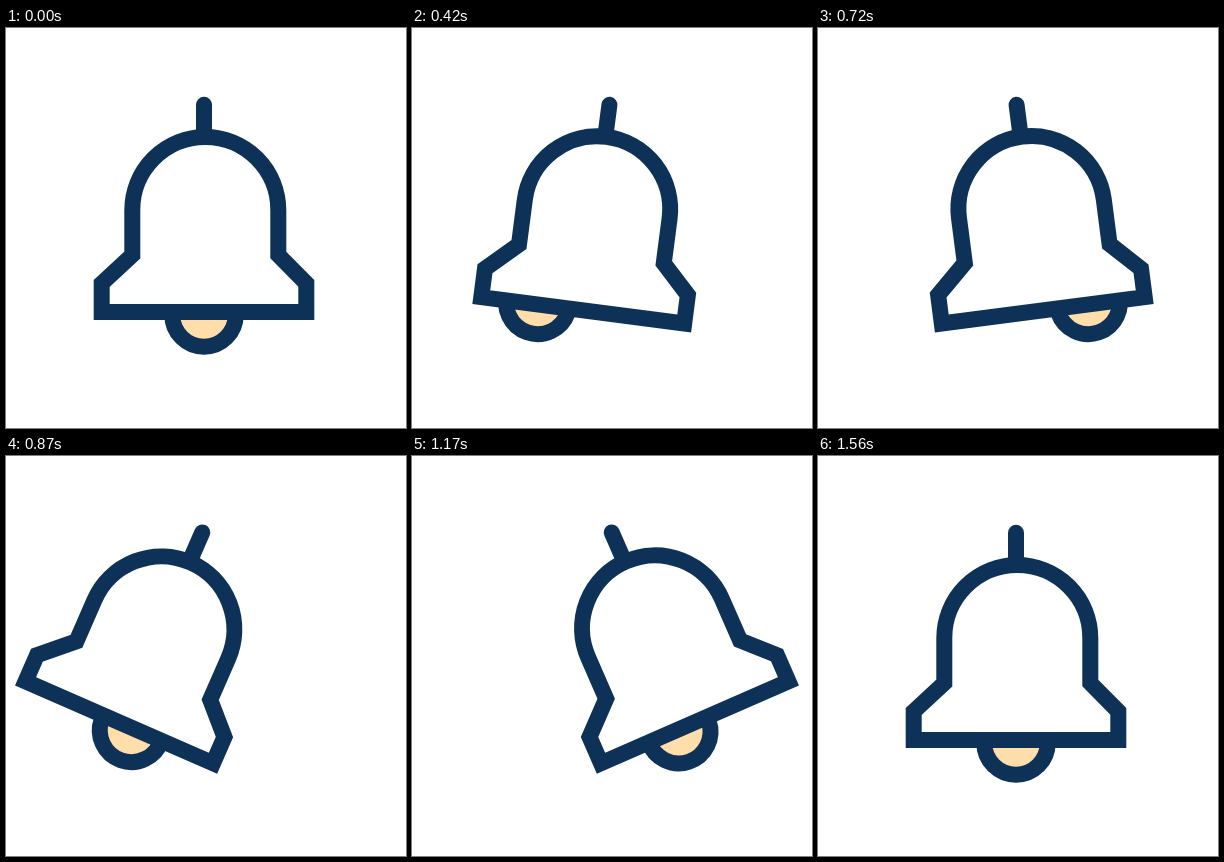
An HTML page for the animation above (2130 ms loop, 400x400 px).

```html
<!DOCTYPE html>
<html lang="en">
<head>
<meta charset="utf-8">
<title>Ringing bell</title>
<style>
  html, body { margin: 0; width: 100%; height: 100%; overflow: hidden; background: #fff; }
  svg { display: block; width: 100%; height: 100%; }
</style>
</head>
<body>
<svg viewBox="0 0 400 400" stroke="#0e3158" stroke-width="16" fill="#fff">
  <g id="bell">
    <circle id="clapper" cx="198" cy="287" r="31.7" fill="#ffdeab"/>
    <path d="M198 76.8V106" stroke-linecap="round"/>
    <path d="M126.3 227V182A73 73 0 0 1 272.3 182V227L300.3 255.4V284H95.7V255.4Z"/>
  </g>
</svg>
<script>
  const STEP = 30, LOOP = 2130, BEAT = 10;
  const PIVOT = "198 72.4";

  const bell = document.getElementById("bell");
  const clapper = document.getElementById("clapper");

  // Smooth rise from 0 to 1 between steps a and b
  function ramp(n, a, b) {
    const p = Math.min(1, Math.max(0, (n - a) / (b - a)));
    return p * p * (3 - 2 * p);
  }

  // Peaks of alternating sign, one per beat from step `first`, at rest by step `end`
  function rock(n, { amp, first, peaks, lastAmp, end }) {
    let angle = 0, from = 0;
    for (let i = 0; i < peaks; i++) {
      const at = first + i * BEAT;
      const size = i === peaks - 1 ? lastAmp : amp;
      const peak = i % 2 ? -size : size;
      angle += (peak - angle) * ramp(n, from, at);
      from = at;
    }
    return angle * (1 - ramp(n, from, end));
  }

  const swing = { amp: 25, first: 10, peaks: 4, lastAmp: 25, end: 50 };
  const lag = { amp: -13, first: 5, peaks: 5, lastAmp: -10, end: 52 };

  function turn(el, angle) {
    el.setAttribute("transform", `rotate(${angle.toFixed(3)} ${PIVOT})`);
  }

  function draw(ms) {
    const n = Math.floor((ms % LOOP) / STEP + 0.001);
    turn(bell, rock(n, swing));
    turn(clapper, rock(n, lag));
  }

  const start = performance.now();
  function tick() {
    draw(Math.max(0, performance.now() - start));
    requestAnimationFrame(tick);
  }
  tick();
</script>
</body>
</html>
```
